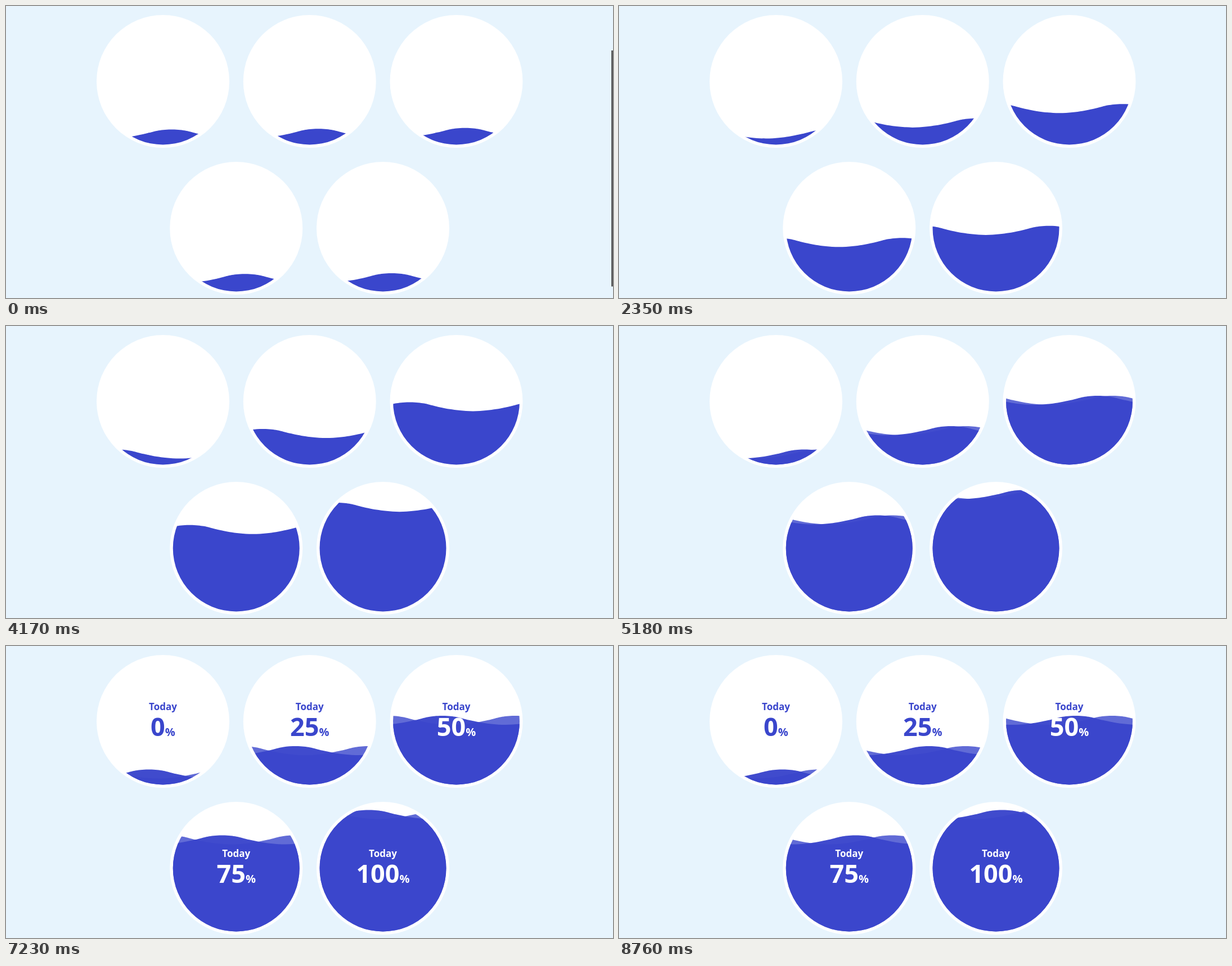
An HTML page that plays this animation: 1079 by 519 pixels, repeating every 8.84 s.

```html
<!DOCTYPE html>
<html lang="en">
<head>
<meta charset="utf-8">
<title>Water levels</title>
<style>
  html, body { margin: 0; width: 100%; height: 100%; overflow: hidden; background: #e7f4fd; }
  svg { display: block; width: 1079px; height: 519px; }
  text { font-family: "Noto Sans", "Open Sans", sans-serif; font-weight: 600; text-anchor: middle; }
  .label { font-size: 17px; }
  .value { font-size: 45px; }
  .unit { font-size: 20px; }
  .wave { fill: #3a46cc; }
  .front { opacity: .97; }
</style>
</head>
<body>
<svg id="stage" viewBox="0 0 1079 519" xmlns="http://www.w3.org/2000/svg">
  <defs>
    <clipPath id="bowl"><circle r="112.5"/></clipPath>
    <path id="wave"/>
  </defs>
  <rect id="bar" x="1076" y="79" width="3" height="419.5" fill="#5c5c5c"/>
</svg>
<script>
  const LOOP = 8840, STEPS = 113;
  const PERIOD = 225, SCALE = PERIOD / 280;
  const EMPTY = 85.5, FULL_AT = 59.5;
  const BLUE = '#3a46cc', WHITE = '#fff';

  // Timelines: [step, value]
  const FILL = [[0, .029], [18, .272], [41, .66], [FULL_AT, 1]];
  const BACK = [[0, 128], [18, 295], [41, 557.5], [66, 864], [80, 992.5], [92, 1117], [112, 1324]];
  const FRONT = [[FULL_AT, 0], [66, 163], [80, 467.5], [92, 762.5], [112, 1274.5]];

  const bowls = [
    { x: 279, y: 134, value: 0, level: 85.5, label: BLUE, number: BLUE },
    { x: 539.75, y: 134, value: 25, level: 44, label: BLUE, number: BLUE },
    { x: 800.5, y: 134, value: 50, level: -10, label: BLUE, number: WHITE },
    { x: 409.25, y: 395, value: 75, level: -58.5, label: WHITE, number: WHITE },
    { x: 670, y: 395, value: 100, level: -103.5, label: WHITE, number: WHITE }
  ];

  const stage = document.getElementById('stage');
  const bar = document.getElementById('bar');

  const fall = 'c13.6-.1 24.3 1.4 31.5 2.7c10.5 2 14.5 3.8 30.1 7.4c.8.2 13.9 3.2 27.3 5.4c12.3 2 29.6 4.1 51.1 4.5';
  const rise = 'c21.5-.4 38.8-2.5 51.1-4.5c13.4-2.2 26.5-5.2 27.3-5.4c15.6-3.6 19.6-5.4 30.1-7.4c7.2-1.3 17.9-2.8 31.5-2.7';
  document.getElementById('wave').setAttribute('d', 'M0 0' + (fall + rise).repeat(2) + 'V420H0z');

  for (const b of bowls) {
    const g = document.createElementNS('http://www.w3.org/2000/svg', 'g');
    g.setAttribute('transform', `translate(${b.x} ${b.y})`);
    g.innerHTML = `
      <circle r="118" fill="#fff"/>
      <g clip-path="url(#bowl)">
        <use class="wave back" href="#wave"/>
        <use class="wave front" href="#wave"/>
        <g class="caption">
          <text class="label" y="-20" fill="${b.label}">Today</text>
          <text class="value" y="26" fill="${b.number}">${b.value}<tspan class="unit">%</tspan></text>
        </g>
      </g>`;
    stage.insertBefore(g, bar);
    b.back = g.querySelector('.back');
    b.front = g.querySelector('.front');
    b.caption = g.querySelector('.caption');
  }

  function at(line, n) {
    if (n <= line[0][0]) return line[0][1];
    for (let i = 1; i < line.length; i++) {
      const [t0, v0] = line[i - 1], [t1, v1] = line[i];
      if (n <= t1) return v0 + (v1 - v0) * (n - t0) / (t1 - t0);
    }
    return line[line.length - 1][1];
  }

  const clamp = v => Math.max(0, Math.min(1, v));
  const outBack = x => 1 + 2.7 * (x - 1) ** 3 + 1.7 * (x - 1) ** 2;

  function place(wave, phase, level) {
    const x = phase % PERIOD - PERIOD - PERIOD / 2;
    wave.setAttribute('transform', `translate(${x} ${level}) scale(${SCALE})`);
  }

  function draw(n) {
    const fill = at(FILL, n), back = at(BACK, n), front = at(FRONT, n);
    const full = n > FULL_AT;
    const x = clamp((n - 71.5) / 11);
    bar.style.display = n < 1 ? '' : 'none';
    for (const b of bowls) {
      const level = EMPTY + (b.level - EMPTY) * fill;
      place(b.back, back, level);
      place(b.front, front, level);
      b.back.style.opacity = full ? .8 : 1;
      b.front.style.display = full ? '' : 'none';
      b.caption.style.opacity = clamp(x * 1.2);
      b.caption.setAttribute('transform', `translate(0 ${40 * (1 - outBack(x))})`);
    }
  }

  const start = performance.now();
  function tick() {
    const t = (performance.now() - start) % LOOP;
    draw(Math.floor(t / LOOP * STEPS));
    requestAnimationFrame(tick);
  }
  tick();
</script>
</body>
</html>
```
